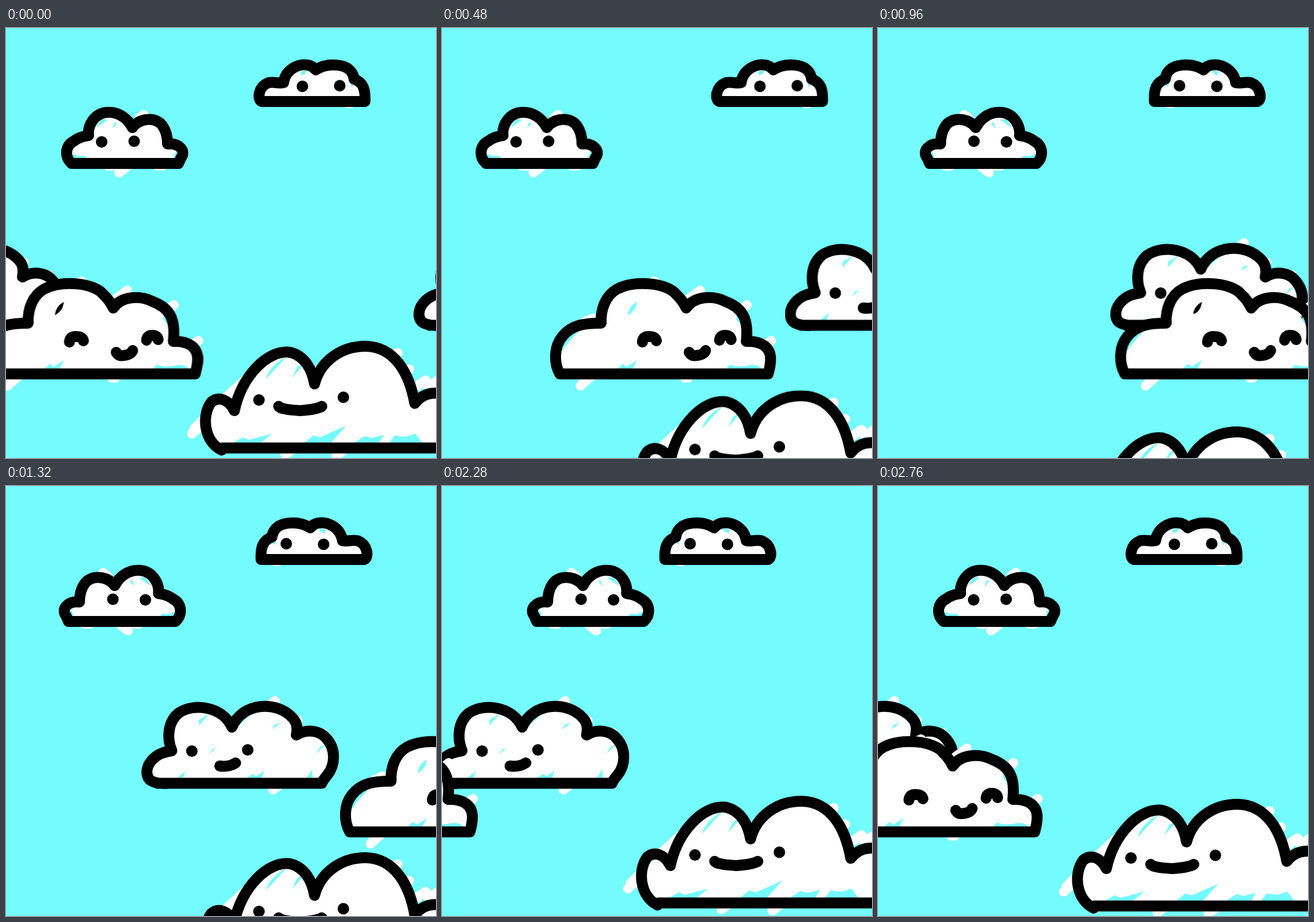
These frames come from a looping animation (708 by 708 pixels, 2.88 s). An HTML page without scripts:

```html
<!DOCTYPE html>
<html lang="en">
<head>
<meta charset="utf-8">
<title>Drifting clouds</title>
<style>
html, body { margin: 0; width: 100%; height: 100%; overflow: hidden; background: #73fbfd; }
svg { display: block; width: 100%; height: 100%; }

.body { fill: #fff; fill-rule: evenodd; }
.fluff, .ink, .eyes { fill: none; stroke-linecap: round; stroke-linejoin: round; }
.fluff { stroke: #fff; stroke-width: 16; }
.ink, .eyes { stroke: #000; stroke-width: 18; }
.eyes { stroke-width: 19; }

.high, .left, .calm, .happy, .big { animation: 2880ms -1ms step-end infinite; }
.high { animation-name: high; transform-origin: 503.5px 0; }
.left { animation-name: left; transform-origin: 195.5px 0; }
.calm { animation-name: calm; }
.happy { animation-name: happy; }
.big { animation-name: big; }

/* The two small clouds patrol and mirror when they turn. */
@keyframes high {
  0%, 100% { transform: translateX(0) scaleX(1); }
  8.33% { transform: translateX(18px) scaleX(1); }
  16.67% { transform: translateX(35.5px) scaleX(1); }
  25% { transform: translateX(57px) scaleX(-1); }
  33.33% { transform: translateX(39px) scaleX(-1); }
  37.5% { transform: translateX(21px) scaleX(-1); }
  45.83% { transform: translateX(4px) scaleX(-1); }
  54.17% { transform: translateX(-14px) scaleX(-1); }
  62.5% { transform: translateX(-32px) scaleX(1); }
  70.83% { transform: translateX(-49px) scaleX(-1); }
  83.33% { transform: translateX(-35px) scaleX(1); }
  87.5% { transform: translateX(-18px) scaleX(1); }
  91.67% { transform: translateX(0) scaleX(1); }
}
@keyframes left {
  0%, 100% { transform: translateX(0) scaleX(1); }
  8.33% { transform: translateX(-18px) scaleX(1); }
  16.67% { transform: translateX(-35.5px) scaleX(1); }
  25% { transform: translateX(-40px) scaleX(-1); }
  33.33% { transform: translateX(-22px) scaleX(-1); }
  41.67% { transform: translateX(-4px) scaleX(-1); }
  50% { transform: translateX(14px) scaleX(-1); }
  58.33% { transform: translateX(31.5px) scaleX(-1); }
  66.67% { transform: translateX(49px) scaleX(-1); }
  83.33% { transform: translateX(17px) scaleX(1); }
  91.67% { transform: translateX(0) scaleX(1); }
}
@keyframes calm {
  0% { transform: translateX(572px); animation-timing-function: steps(4); }
  16.67% { transform: translateX(465.5px); animation-timing-function: steps(4); }
  33.33% { transform: translateX(283.5px); animation-timing-function: steps(3); }
  45.83% { transform: translateX(124px); animation-timing-function: steps(4); }
  62.5% { transform: translateX(0); animation-timing-function: steps(4); }
  79.17% { transform: translateX(-116px); animation-timing-function: steps(4); }
  95.83% { transform: translateX(-292px); }
  100% { transform: translateX(-327px); }
}
@keyframes happy {
  0% { transform: translateX(-225.5px); animation-timing-function: steps(4); }
  16.67% { transform: translateX(0); animation-timing-function: steps(4); }
  33.33% { transform: translateX(212.5px); animation-timing-function: steps(3); }
  45.83% { transform: translateX(372px); animation-timing-function: steps(3); }
  58.33% { transform: translateX(532px); }
  75% { transform: translateX(-544px); animation-timing-function: steps(5); }
  95.83% { transform: translateX(-279px); }
  100% { transform: translateX(-225.5px); }
}
@keyframes big {
  0% { transform: translateY(0); animation-timing-function: steps(4); }
  16.67% { transform: translateY(81.5px); animation-timing-function: steps(3); }
  29.17% { transform: translateY(143px); }
  33.33% { transform: translateY(141px); animation-timing-function: steps(3); }
  45.83% { transform: translateY(88px); animation-timing-function: steps(4); }
  62.5% { transform: translateY(17.5px); animation-timing-function: steps(2); }
  70.83% { transform: translateY(-5px); }
  79.17% { transform: translateY(-5px); animation-timing-function: steps(4); }
  95.83%, 100% { transform: translateY(0); }
}
</style>
</head>
<body>
<svg viewBox="0 0 708 708">
  <defs>
    <g id="calm">
      <path class="fluff" d="M298 372L319 354M316 500L326 492M385 412L398 407M345 392L356 386"/>
      <path class="body" d="M140 490C118 490 108 485 108 471C108 458 118 448 128 442Q136 438 149 436C140 414 143 388 160 374C184 357 232 362 248 397C265 356 322 353 348 382Q358 392 354 410C372 399 393 403 403 415C420 433 418 460 405 476Q398 484 396 490Z
        M211 375l-17 10v9zM222 431l-12 11 5-8zM284 372l-24 22 7-15zM328 390l-14 11 4-8zM402 426l-16 15 8-12zM172 469l-14 12h9zM272 482l10-8 6 4 13-9-4 13zM380 467l-10 15h11z"/>
      <path class="ink" d="M140 490C118 490 108 485 108 471C108 458 118 448 128 442Q136 438 149 436C140 414 143 388 160 374C184 357 232 362 248 397C265 356 322 353 348 382Q358 392 354 410C372 399 393 403 403 415C420 433 418 460 405 476Q398 484 396 489.500H125M228 461Q243 463 254 456"/>
      <path class="eyes" d="M182 436.500h.01M274 434.500h.01"/>
    </g>
  </defs>

  <g class="high">
    <path class="fluff" d="M563 124h4"/>
    <path class="body" d="M421 121C413 117 416 97 430 91C438 87 448 92 457 90C460 68 482 58 497 61Q504 62 510 69C527 57 552 60 562 66Q572 73 573 84C588 89 592 101 591 121Z
      M485 72l12-4-4 7-7 3zM567 88l8 4-7 5z"/>
    <path class="ink" d="M421 121C413 117 416 97 430 91C438 87 448 92 457 90C460 68 482 58 497 61Q504 62 510 69C527 57 552 60 562 66Q572 73 573 84C588 89 592 101 591 121Z"/>
    <path class="eyes" d="M488 96h.01M549.500 95h.01"/>
  </g>

  <g class="left">
    <path class="fluff" d="M220 148L227 143M186 238L198 229M168 227h6M250 227h8"/>
    <path class="body" d="M108 223C96 212 97 194 112 186C120 180 128 178 136 177C134 160 146 141 165 139C184 137 200 148 208 164C220 148 245 146 257 160Q266 172 266 191C286 189 297 203 288 214L284 223Z
      M158 150l10 1-14 10-6 3zM183 157l-8 9 4-11zM108 214l2-7 9 4 10-1 4 4zM287 200l-7 4-5 10 9-3z"/>
    <path class="ink" d="M108 223C96 212 97 194 112 186C120 180 128 178 136 177C134 160 146 141 165 139C184 137 200 148 208 164C220 148 245 146 257 160Q266 172 266 191C286 189 297 203 288 214L284 223Z"/>
    <path class="eyes" d="M157.500 187.500h.01M211 186.500h.01"/>
  </g>

  <g class="calm">
    <use href="#calm"/>
    <use href="#calm" x="-899"/>
  </g>

  <g class="happy">
    <path class="fluff" d="M228 589L246 573M340 422L350 417M404 448L425 432M488 467L502 456M525 528L542 515M400 576h5M235 484L248 478"/>
    <path class="body" d="M194 570C184 552 184 525 198 508C214 488 236 486 262 486C261 462 270 440 288 430C318 414 372 420 386 439Q396 448 402 461C416 441 446 440 466 450C496 461 505 480 501 516C528 515 541 527 541 545Q541 556 537 570Z
      M321 451q-13 6-15 22q10-6 13-14zM196 535q8-16 34-40l-18 3-18 18zM288 562l10-9 6 5 17-11-8 15zM468 562q6-11 11-6 14 3 28-1 14-2 20 7zM484 468l9 10-2 10-6-8z"/>
    <path class="ink" d="M194 569.500C184 552 184 525 198 508C214 488 236 486 262 486C261 462 270 440 288 430C318 414 372 420 386 439Q396 448 402 461C416 441 446 440 466 450C496 461 505 480 501 516C528 515 541 527 541 545Q541 556 537 569.500Z
      M330 517Q331 507 341 508Q351 508 353 515M457 514Q458 506 466 506Q475 506 476 513M407 534Q411 541 420 539Q431 538 434 531"/>
  </g>

  <g class="big">
    <path class="fluff" d="M306 668L345 634M310 660L340 630M358 612L400 574M366 618L400 582M634 541L645 535M652 568L664 562M676 590L691 580M696 590L712 580M460 702L474 692M544 704L560 692"/>
    <path class="body" d="M356 691C325 680 322 637 338 616C350 606 366 611 376 630C388 574 430 529 468 534C492 540 504 562 508 586C518 548 552 524 592 524C640 525 664 568 673 618C686 602 700 599 725 602V691Z
      M462 541l-34 37q6-22 34-37zM495 548l-24 28 8-17zM372 684l18-10 10 4 38-10-20 16zM490 684l16-13 11 3 43-19-26 29zM572 684l18-12 12 3 20-5-8 14zM630 684l10-13 18 2 16-5 12 16zM640 548l10 14-6-3z"/>
    <path class="ink" d="M725 691.500H356L355 695C325 680 322 637 338 616C350 606 366 611 376 630C388 574 430 529 468 534C492 540 504 562 508 586C518 548 552 524 592 524C640 525 664 568 673 618C686 602 700 599 725 602
      M449 623Q452 628 484 630Q512 628 520 623"/>
    <path class="eyes" d="M416.500 612.500h.01M555.500 608h.01"/>
  </g>
</svg>
</body>
</html>
```
